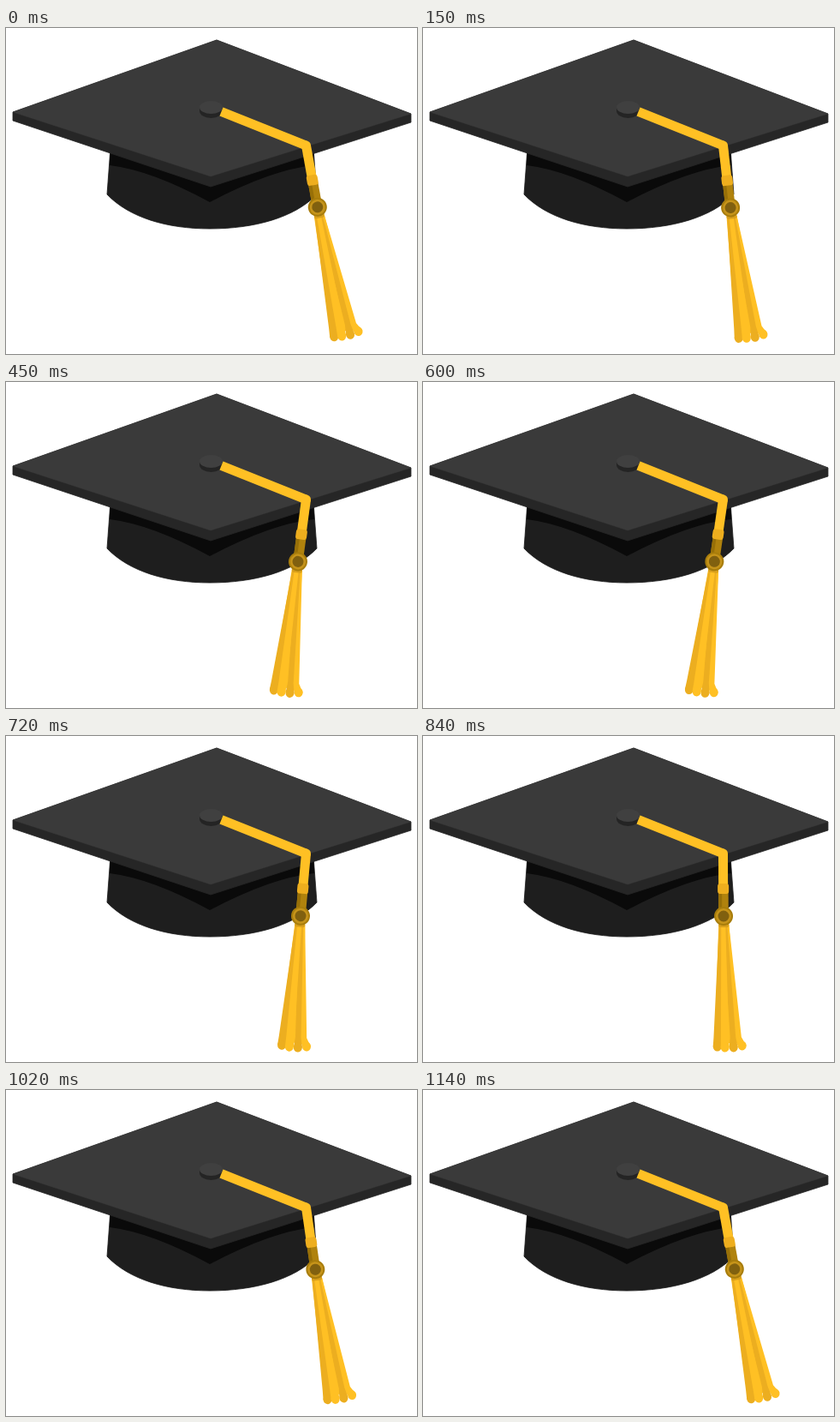
An HTML page with a canvas for the animation above (1200 ms loop, 480 by 380 pixels).

```html
<!DOCTYPE html>
<html lang="en">
<head>
<meta charset="utf-8">
<title>Graduation cap</title>
<style>
html, body { margin: 0; width: 100%; height: 100%; overflow: hidden; background: #fff; }
canvas { display: block; }
</style>
</head>
<body>
<canvas id="stage" width="480" height="380"></canvas>
<script>
const ctx = document.getElementById('stage').getContext('2d');
const LOOP = 1200, STEP = 30;
const RIGHT = 10.25, LEFT = -8.35;
const GOLD = '#ffc024', AMBER = '#ecae20';

// grow widens the shape by a thin outline of the same colour
function fill(d, color, grow = 0) {
  const path = new Path2D(d);
  ctx.fillStyle = color;
  ctx.fill(path);
  if (!grow) return;
  ctx.strokeStyle = color;
  ctx.lineWidth = grow;
  ctx.stroke(path);
}

function oval(x, y, rx, ry, color) {
  ctx.fillStyle = color;
  ctx.beginPath();
  ctx.ellipse(x, y, rx, ry, 0, 0, Math.PI * 2);
  ctx.fill();
}

function box(x, y, w, h, r, color) {
  ctx.fillStyle = color;
  ctx.beginPath();
  ctx.roundRect(x, y, w, h, r);
  ctx.fill();
}

function line(x1, y1, x2, y2, width, color) {
  ctx.strokeStyle = color;
  ctx.lineWidth = width;
  ctx.beginPath();
  ctx.moveTo(x1, y1);
  ctx.lineTo(x2, y2);
  ctx.stroke();
}

function drawCap() {
  // Skull piece and the shadow under the board
  fill('M122 140 L118 194 C144 221 188 234 238 234 C290 234 337 221 363 194 L359 140 Z', '#1e1e1e', 0.8);
  fill('M122 140 L121 160 Q170 166 238 203 Q310 165 360 160 L359 140 Z', '#0a0a0a');
  // Board
  fill('M8 98 L246 14 L473 100 V110 L239 185 L8 108 Z', '#262626', 0.8);
  fill('M246 14 L473 100 L239 173 L8 98 Z', '#3a3a3a', 0.4);
  // Button
  oval(239.5, 96.5, 13.5, 8.5, '#242424');
  box(226, 92, 27, 5, 0, '#242424');
  oval(239.5, 92.5, 13.5, 7.5, '#404040');
}

// A tapered strand; flare bends its tip outwards
function strand(topX, endX, endY, color, half = 4.6, flare = 0) {
  const kneeX = topX + (endX - topX) * 0.92 - flare;
  fill(`M${topX - 2.5} 220 L${kneeX - half} 351 L${endX - 5} ${endY}
    H${endX + 5} L${kneeX + half} 351 L${topX + 2.5} 220 Z`, color);
  oval(endX, endY, 5, 5.5, color);
}

function drawTassel(angle) {
  ctx.save();
  ctx.translate(350.5, 137);
  ctx.rotate(-angle * Math.PI / 180);
  ctx.translate(-350.5, -137);
  line(350.5, 137, 350.5, 178, 11, GOLD);
  fill('M345 220 H357 L368 358 H340 Z', GOLD);
  strand(348, 343, 362, AMBER);
  strand(354.5, 372, 361, GOLD, 4.6, 4);
  strand(352.5, 362, 363, AMBER, 3.3);
  strand(350.5, 352, 363, GOLD);
  box(345, 217, 12, 6, 2, '#d9a01c');
  box(345, 182, 11.5, 22, 0, '#b0820d');
  box(345, 182, 4, 22, 0, '#987008');
  box(344, 172, 13, 12, 3, '#eeae1e');
  oval(350.8, 210, 11, 11, '#a87d0c');
  oval(350.8, 210, 9, 9, '#c6941a');
  oval(350.8, 210, 6.5, 6.5, '#80600f');
  ctx.restore();
}

function ease(t, start, end) {
  const u = Math.min(1, Math.max(0, (t - start) / (end - start)));
  return (1 - Math.cos(Math.PI * u)) / 2;
}

// Swing left, rest, swing right, rest
function swing(t) {
  return RIGHT + (LEFT - RIGHT) * (ease(t, 0, 510) - ease(t, 570, 1140));
}

function draw(t) {
  ctx.fillStyle = '#fff';
  ctx.fillRect(0, 0, 480, 380);
  drawCap();
  line(251.5, 97.5, 350.5, 137, 11, GOLD);
  oval(350.5, 137, 5.5, 5.5, GOLD);
  drawTassel(swing(t));
}

function tick(now) {
  draw(Math.floor((now % LOOP) / STEP) * STEP);
  requestAnimationFrame(tick);
}

requestAnimationFrame(tick);
</script>
</body>
</html>
```
